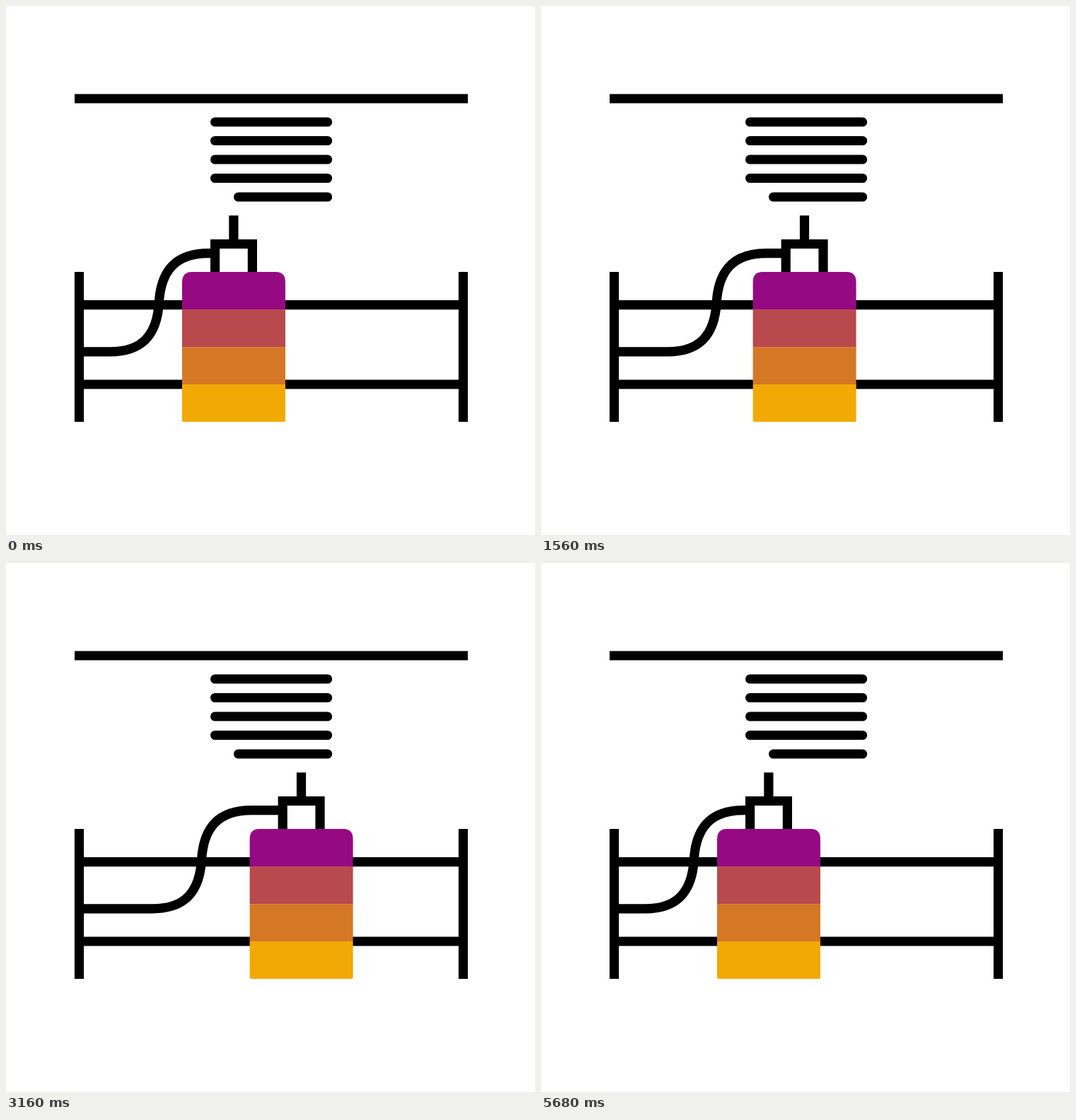
Recreate the animation shown at these times as an HTML page. Size 748x748 px, loop 5.76 s.

```html
<!DOCTYPE html>
<html lang="en">
<head>
<meta charset="utf-8">
<title>Spray line</title>
<style>
  html, body { margin: 0; width: 100%; height: 100%; overflow: hidden; background: #fff; }
  svg { display: block; width: 100vw; height: 100vh; }
  .line { fill: none; stroke: #000; stroke-width: 13.2; }
</style>
</head>
<body>
<svg viewBox="0 0 748 748">
  <g class="line">
    <path d="M97 131H653"/>
    <path stroke-linecap="round" d="M295.6 164H454.6M295.6 190.5H454.6M295.6 217H454.6M295.6 243.5H454.6M328.6 270H454.6"/>
    <path d="M103.5 376V588M646.5 376V588M103.5 422.6H646.5M103.5 535H646.5"/>
    <path id="hose"/>
  </g>
  <g id="bottle">
    <path class="line" d="M321.9 296.3V336.5M295.6 380V336.5H348.4V380"/>
    <path fill="#950a82" d="M249 429.5V390.5Q249 376 262.5 376H381.5Q395 376 395 390.5V429.5Z"/>
    <path fill="#b8494c" d="M249 429.3H395V482.5H249Z"/>
    <path fill="#d47826" d="M249 482.2H395V535.3H249Z"/>
    <path fill="#f2a906" d="M249 535H395V586Q395 588 393 588H251Q249 588 249 586Z"/>
  </g>
</svg>
<script>
  const LOOP = 5760, STEP = 40;
  const LEG = 960, TRAVEL = 135, HOSE_RATIO = 0.63;
  const hose = document.getElementById('hose');
  const bottle = document.getElementById('bottle');

  // Two trips right and back at constant speed, then a rest.
  function offsetAt(t) {
    if (t >= 4 * LEG) return 0;
    const phase = (t / LEG) % 2;
    return TRAVEL * (1 - Math.abs(phase - 1));
  }

  function hosePath(offset) {
    const bend = offset * HOSE_RATIO;
    const x = v => (v + bend).toFixed(2);
    return `M97 488.8H${x(147)}C${x(193)} 488.8 ${x(213.5)} 465 ${x(216.3)} 419.5` +
      `S${x(240)} 349.6 ${x(286.5)} 349.6H${(296 + offset).toFixed(2)}`;
  }

  function draw(t) {
    const offset = offsetAt(Math.floor(t / STEP) * STEP);
    bottle.setAttribute('transform', `translate(${offset.toFixed(2)} 0)`);
    hose.setAttribute('d', hosePath(offset));
  }

  const start = performance.now();
  function tick() {
    draw((performance.now() - start) % LOOP);
    requestAnimationFrame(tick);
  }
  tick();
</script>
</body>
</html>
```
